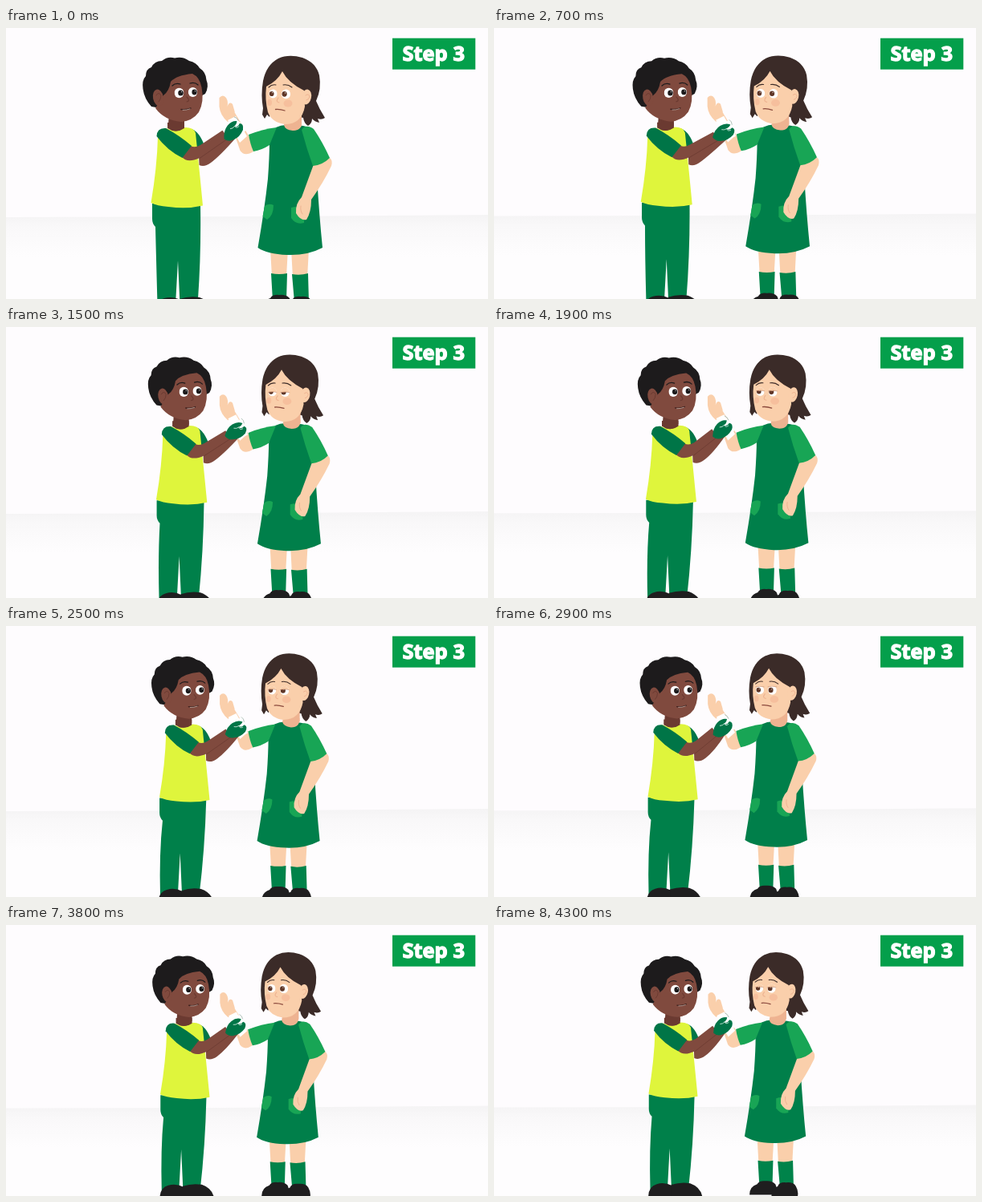
Animation of 600x338 px, one loop 4.4 s. Source, as an HTML page with a canvas:

```html
<!DOCTYPE html>
<html lang="en">
<head>
<meta charset="utf-8">
<title>Step 3</title>
<style>
html, body { margin: 0; width: 100%; height: 100%; overflow: hidden; background: #fefcfe; }
canvas { display: block; width: 600px; height: 338px; }
</style>
</head>
<body>
<canvas id="stage" width="600" height="338"></canvas>
<script>
const ctx = document.getElementById('stage').getContext('2d');
const LOOP = 4400, STEP = 100;
const C = {
  brown: '#804a3e', brownDark: '#6b3a31', black: '#1d1b1c', lime: '#dff53c',
  dark: '#007547', trousers: '#00804a', dress: '#007f4a', green: '#18a555',
  sock: '#00834a', skin: '#facfab', skinDark: '#eeb391', hair: '#3b2b28', shoe: '#1f1e1f'
};

const ramp = (t, a, b) => {
  const u = Math.min(1, Math.max(0, (t - a) / (b - a)));
  return u * u * (3 - 2 * u);
};

function shape(d, color) {
  ctx.fillStyle = color;
  ctx.fill(new Path2D(d));
}

function line(d, color, width) {
  ctx.strokeStyle = color;
  ctx.lineWidth = width;
  ctx.lineCap = ctx.lineJoin = 'round';
  ctx.stroke(new Path2D(d));
}

function oval(x, y, rx, ry, color, turn = 0) {
  ctx.fillStyle = color;
  ctx.beginPath();
  ctx.ellipse(x, y, rx, ry, turn, 0, Math.PI * 2);
  ctx.fill();
}

function moved(x, y, draw, turn = 0) {
  ctx.save();
  ctx.translate(x, y);
  ctx.rotate(turn);
  draw();
  ctx.restore();
}

function eye(x, y, r, look, iris, lid, lidColor) {
  ctx.save();
  ctx.beginPath();
  ctx.ellipse(x, y, r, r * 1.05, 0, 0, Math.PI * 2);
  ctx.clip();
  ctx.fillStyle = '#fff';
  ctx.fillRect(x - r, y - r - 1, 2 * r, 2 * r + 2);
  oval(x + look, y, r * 0.55, r * 0.6, iris);
  oval(x + look + 1, y - 1.4, 0.6, 0.6, '#fff');
  if (lid > 0) {
    ctx.fillStyle = lidColor;
    ctx.fillRect(x - r - 1, y - r - 2, 2 * r + 2, 2 + 2 * r * lid);
  }
  ctx.restore();
  if (lid > 0.05) {
    const ly = y - r + 2 * r * lid;
    line(`M${x - r} ${ly + .5}Q${x} ${ly - 1} ${x + r} ${ly + .5}`, '#c98f70', 0.7);
  }
}

function floor(p) {
  const y = 235 - 8.5 * p;
  const g = ctx.createLinearGradient(0, y, 0, y + 50);
  g.addColorStop(0, '#f5f4f5');
  g.addColorStop(0.25, '#f9f8f9');
  g.addColorStop(1, '#fefdfe');
  ctx.fillStyle = g;
  ctx.beginPath();
  ctx.moveTo(0, y + 1);
  ctx.quadraticCurveTo(300, y + 1, 600, y - 2);
  ctx.lineTo(600, 338);
  ctx.lineTo(0, 338);
  ctx.fill();
}

function badge() {
  ctx.fillStyle = '#049f4b';
  ctx.fillRect(481, 12.7, 103.3, 39);
  ctx.fillStyle = ctx.strokeStyle = '#fff';
  ctx.font = '800 25.5px "Noto Sans", "Open Sans", sans-serif';
  ctx.textAlign = 'center';
  ctx.textBaseline = 'alphabetic';
  ctx.lineWidth = 1.3;
  ctx.fillText('Step 3', 532.2, 41);
  ctx.strokeText('Step 3', 532.2, 41);
}

function girlLegs() {
  shape('M329 275H351L349 310H331Z M355 275H377L375 312H357Z', C.skin);
  shape('M330 306Q340 308 350 306L349 340H332Z M356 307Q366 309 376 306L377 342H359Z', C.sock);
  shape('M319 351Q319 340 329 337Q332 332 340 333Q348 332 353 337Q356 344 355 351Z', C.shoe);
  shape('M348 354Q347 343 356 340Q358 334 367 335Q377 334 380 340Q384 347 382 354Z', C.shoe);
}

function girlHead(lid) {
  // Hair behind the face
  shape('M320 100Q317 84 320 66Q324 46 339 38Q352 32 369 37Q386 43 390 59Q393 76 386 91Q390 101 397 112Q393 115 388 113L390 118Q384 117 381 113Q381 119 376 122Q371 119 370 112L330 104L328 111L325 108L322 113L319 108Z', C.hair);
  shape('M348 108H368V122Q364 129 355 127Q349 126 347 121Z', C.skinDark);
  shape('M324 73Q338 66 344 54Q351 68 371 78L372 98Q368 120 347 120Q331 118 326 105Q322 89 324 73Z', C.skin);
  oval(374, 86, 6, 9.5, C.skin, 0.2);
  line('M373 84Q377 81 378 86Q376 90 374 90', C.skinDark, 1);
  oval(351, 94, 5.5, 4.5, '#f6bf9d');
  oval(328, 93, 3, 4, '#f6bf9d');
  eye(332.5, 82, 5.2, -1.8, '#5f3627', lid, C.skin);
  eye(348.5, 82.3, 5.6, -1.9, '#5f3627', lid, C.skin);
  line('M327 74Q331 70 336 71M345 71Q351 70 356 74', C.hair, 1.1);
  line('M339 87Q335 92 340 93', C.skinDark, 1.2);
  line('M335.5 101.5Q341 101 347 103', '#8b4a3d', 1.3);
}

function girlBody() {
  shape('M336 124Q346 119 356 122Q365 120 378 124Q386 150 387 185Q390 235 394 274Q375 284 350 283Q325 282 313.5 274Q322 225 326 188Q328 160 328 142Z', C.dress);
  shape('M347 116H368Q369 128 357 128Q347 127 346 121Z', C.skinDark);
  // Arm held out
  shape('M276 108L285 106L303 136L308 154Q297 161 291.5 153Z', C.skin);
  shape('M265.5 87Q270 82 274 87Q277 92 275.5 98Q278 91 282 95Q285.5 104 285.5 113L276 117Q266.5 109 265.5 98Z', C.skin);
  shape('M337 124Q320 126 302 133Q304 145 308 154Q319 152 328 146Z', C.green);
  // Pockets and resting arm
  shape('M322 222Q328 218 333 221Q333 234 325 239L319.5 235Z', C.green);
  shape('M355 224Q364 221 371 226V243Q361 246 355 237Z', C.green);
  shape('M383 170L403 162Q407 165 405 172Q395 193 380 214Q380 230 374 239Q367 241 361 231Q360 219 368 211Z', C.skin);
  line('M367 222Q366 228 369 232', C.skinDark, 1);
  shape('M368 127Q373 119 383 126Q394 142 403 162Q394 171 382 172Q374 150 368 127Z', C.green);
}

function boyLegs(dx) {
  shape(`M${182 + dx} 219L${242 + dx} 221Q${243 + dx * .5} 285 238.5 345H216.5L214 290L211 345H188.5Q187 290 ${186 + dx} 248Q${182 + dx} 244 ${182 + dx} 238Z`, C.trousers);
  shape('M186 354Q186 340 197 337Q207 334 217 339V354Z', C.shoe);
  shape('M216 354V338Q228 334 241 336Q255 341 257 354Z', C.shoe);
}

function boyHead() {
  shape('M181 98Q172 88 170.5 76Q169 65 174 60Q174 51 181 49Q185 41 194 41Q201 35 210 37.5Q220 35 228 41Q237 43 241 50Q249 55 249.5 65Q253 73 248 82L210 103Z', C.black);
  shape('M203 106H222V122Q218 130 207 128Q202 126 202 121Z', C.brownDark);
  shape('M196 84Q203 79 205 67Q212 59 232 57Q241 61 243.5 74Q247 92 240 105Q232 116 218 117Q197 115 186 100Z', C.brown);
  oval(189.5, 87, 6.5, 10.5, C.brown, -0.2);
  line('M187 84Q190 79 193 84Q193 89 190 92', C.brownDark, 1);
  eye(215.5, 81, 5.9, 2, C.black, 0, C.brown);
  eye(232.5, 80, 5.7, 2, C.black, 0, C.brown);
  line('M207 72Q211 68 217 70M229 69Q235 67 239 71', C.black, 1.3);
  line('M225 86Q230 91 225 92', C.brownDark, 1.2);
  line('M218 101.5Q225 102.5 230 100', '#3c201d', 1.4);
  line('M220 102.4Q225 102.6 229 100.9', '#d8c4bb', 0.7);
}

function boyBody(dx, hand) {
  const wx = hand.x - 9, wy = hand.y + 5;
  const at = (x, y) => `${x + dx} ${y}`;
  // Far arm
  shape(`M${at(231, 126)}Q${at(242, 130)} ${at(248, 150)}L${at(238, 158)}Z`, C.dark);
  shape(`M${at(240, 157)}L${wx + 1} ${wy - 1}L${wx + 13} ${wy + 4}Q${at(266, 160)} ${at(255, 168)}Q${at(247, 174)} ${at(240.5, 171)}Z`, C.brown);
  moved(dx, 0, () => {
    shape('M199 125Q211 130 223 124Q234 124 236 131Q241 180 245 221.5Q226 226 202 223Q188 222 180.5 218Q188 174 189 136Z', C.lime);
    shape('M201 118H222V125Q212 132 201 125Z', C.brownDark);
  });
  // Near arm
  shape(`M${at(219, 161)}L${at(230, 147)}Q${at(235, 150)} ${at(242, 146)}L${wx - 4} ${wy - 5}L${wx + 4} ${wy + 5}L${at(241, 162)}Q${at(226, 169)} ${at(219, 161)}Z`, C.brown);
  line(`M${at(241, 162.5)}L${wx + 3} ${wy + 5}`, C.brownDark, 0.8);
  moved(dx, 0, () =>
    shape('M187.5 135Q188 124 199 125Q216 134 231 147L219.5 162Q201 153 187.5 135Z', C.dark));
}

function cloth(hand) {
  shape('M276 115L286 110L300 135L291 143Z', '#fff');
  moved(hand.x, hand.y, () => {
    shape('M-2 -10L8 -15L13 -4L15 6L2 11Z', '#fff');
    line('M8 -15Q11 -13 11 -9', '#9fb3aa', 0.8);
  }, hand.turn);
}

function glove(hand) {
  moved(hand.x, hand.y, () => {
    shape('M-14 6Q-11 -4 -4 -8Q3 -12 9 -9Q8 -6 4 -4Q7 -1 11 -5Q16 -3 12 4Q5 11 -3 11Q-10 12 -14 6Z', C.dark);
    line('M4 -4Q1 -2 -2 -3M4 -4Q5 0 9 -2', '#dff0e8', 0.8);
  }, hand.turn);
}

function draw(ms) {
  const t = ms / 1000, p = ms / 4300;
  const scale = 1 - 0.053 * p;
  const sway = 7 * ramp(t, 0, 2.6) - 1.2 * ramp(t, 2.6, 4.4);
  const rub = 0.5 - 0.5 * Math.cos(2 * Math.PI * (t - 0.1));
  const hand = { x: 282 + 4 * rub, y: 127.5 + 3 * rub, turn: -0.42 + 0.42 * rub };
  const lid = 0.5 * ramp(t, 1.2, 1.5) - 0.13 * ramp(t, 1.5, 1.9)
    - 0.37 * ramp(t, 2.6, 3) + 0.33 * ramp(t, 3.8, 4.1);

  ctx.fillStyle = '#fefcfe';
  ctx.fillRect(0, 0, 600, 338);
  floor(p);

  ctx.save();
  ctx.translate(16 * p, 4 * p);
  ctx.scale(scale, scale);
  girlLegs();
  boyLegs(sway * 0.8);
  moved(-p, 0, girlBody);
  moved(-0.6 * p, -3 * p, () => girlHead(lid));
  cloth(hand);
  boyBody(sway, hand);
  moved(sway, 0, boyHead);
  glove(hand);
  ctx.restore();

  badge();
}

const start = performance.now();
function tick() {
  const ms = (performance.now() - start) % LOOP;
  draw(Math.floor(ms / STEP) * STEP);
  requestAnimationFrame(tick);
}
tick();
</script>
</body>
</html>
```
